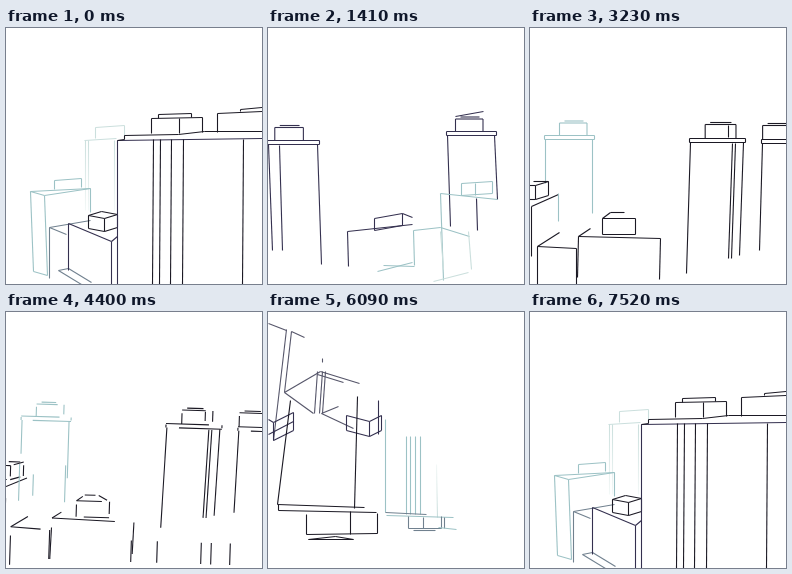
An HTML page with a canvas for the animation above (8 s loop, 256 px wide and 256 px high).

```html
<!DOCTYPE html>
<html>
<head>
<meta charset="utf-8">
<title>Line city</title>
<style>
html, body { margin: 0; width: 100%; height: 100%; overflow: hidden; background: #fff; }
canvas { display: block; width: 100vw; height: 100vh; }
</style>
</head>
<body>
<canvas id="stage"></canvas>
<script>
const SIZE = 256, LOOP = 8000, STEP = 130;
const canvas = document.getElementById('stage');
const ctx = canvas.getContext('2d');
const ratio = window.devicePixelRatio || 1;
canvas.width = canvas.height = SIZE * ratio;

const INK = '#1b1924', NAVY = '#34304f', GREY = '#56566a', SLATE = '#71818f';
const TEAL = '#9cc2c5', PALE = '#cbdfdd', MIST = '#f3f8f7';

const line = (color, x, y, dx, dy, end) => [{ color, x, y, dx, dy, end }];

const posts = (color, xs, y, h, lean = 0, end) =>
  xs.flatMap(x => line(color, x, y, lean, h, end));

// A block with top corners A, B, C, D and feet a, b, c, d.
// Each word of the walk is a chain of edges, such as "aABb" for an open front face.
function box(color, x, y, w, h, walk, { tilt = 0, lean = 0, depth = [0, 0], angle = 0 } = {}) {
  const top = { A: [0, 0], B: [w, tilt], C: [w + depth[0], tilt + depth[1]], D: depth };
  const sin = Math.sin(angle * Math.PI / 180), cos = Math.cos(angle * Math.PI / 180);
  const corner = name => {
    const foot = name !== name.toUpperCase();
    const [u, v] = top[name.toUpperCase()];
    const px = u + (foot ? lean : 0), py = v + (foot ? h : 0);
    return [x + px * cos - py * sin, y + px * sin + py * cos];
  };
  return walk.split(' ').flatMap(chain => {
    const pts = [...chain].map(corner);
    return pts.slice(1).flatMap(([qx, qy], i) => {
      const [px, py] = pts[i];
      return line(color, px, py, qx - px, qy - py);
    });
  });
}

// A tower seen from the front: roof slab, hut with a lid, and two legs.
function tower(color, x, y, w, [left, right], { lean = 0, hut = 0.3 } = {}) {
  const hutX = x + w * hut, hutH = w / 4;
  return [
    box(color, x, y, w, 4, 'aABba'),
    posts(color, [x + 1], y + 4, left, lean),
    posts(color, [x + w - 2], y + 4, right, lean),
    box(color, hutX, y - hutH, w * 0.55, hutH, 'aABb'),
    line(color, hutX + 5, y - hutH - 2, w * 0.38, 0)
  ].flat();
}

const skyline = [
  box(PALE, 78, 112, 32, 0, 'AB', { tilt: -2 }),
  box(PALE, 89, 99, 29, 11, 'aABb', { tilt: -2 }),
  posts(PALE, [79, 82, 108], 112, 70, 0, MIST),
  box(TEAL, 24, 163, 14, 80, 'baABCA Bb', { tilt: 4, lean: 3, depth: [46, -7] }),
  box(TEAL, 48, 152, 27, 9, 'aABb', { tilt: -2 }),
  posts(TEAL, [84], 160, 24),
  box(SLATE, 43, 199, 17, 51, 'aAB AD', { tilt: 7, depth: [41, -7] }),
  box(SLATE, 52, 242, 23, 0, 'BADC', { tilt: 14, depth: [10, -2] }),
  box(NAVY, 62, 195, 43, 47, 'aABb BC', { tilt: 18, depth: [6, -5] }),
  box(INK, 82, 187, 16, 13, 'aABCDA Bb abcC', { tilt: 3, depth: [13, -4] }),
  box(NAVY, 111, 112, 145, 144, 'aAB', { tilt: -2 }),
  posts(INK, [147, 154, 165, 177, 237], 111, 145, -1),
  box(INK, 118, 107, 54, 4, 'aABC', { tilt: -1, depth: [26, -3] }),
  line(INK, 198, 103, 58, 0),
  line(INK, 111, 112, 7, -1),
  box(INK, 145, 90, 51, 15, 'aABb', { tilt: -1 }),
  box(INK, 152, 86, 33, 4, 'aABb', { tilt: -1 }),
  posts(INK, [173], 90, 15),
  box(INK, 211, 85, 45, 19, 'aAB', { tilt: -2 }),
  box(INK, 234, 81, 22, 2, 'aAB', { tilt: -2 })
].flat();

const avenue = [
  tower(NAVY, -1, 112, 52, [106, 120], { lean: 4, hut: 0.14 }),
  posts(NAVY, [11], 117, 105, 3),
  tower(NAVY, 178, 103, 50, [91, 64], { lean: 3, hut: 0.18 }),
  posts(NAVY, [208], 170, 32, 1),
  line(NAVY, 187, 88, 28, -5),
  box(NAVY, 79, 203, 65, 35, 'aAB', { tilt: -7, lean: 1 }),
  box(NAVY, 106, 190, 28, 12, 'aABba BC', { tilt: -5, depth: [10, 4] }),
  box(TEAL, 172, 165, 57, 87, 'aAB', { tilt: 6, lean: 3 }),
  box(TEAL, 193, 155, 31, 12, 'aABba', { tilt: -2 }),
  posts(TEAL, [207], 155, 12),
  box(TEAL, 145, 202, 27, 35, 'aABC', { tilt: -3, lean: 1, depth: [29, 9] }),
  posts(PALE, [172, 200], 203, 38, 3),
  line(TEAL, 109, 243, 35, -9),
  line(TEAL, 115, 237, 31, 1),
  line(PALE, 165, 253, 35, -9)
].flat();

const rooftops = [
  box(INK, 38, 74, 39, 15, 'aABCc Bb', { tilt: 2, depth: [12, -9] }),
  box(INK, 51, 67, 33, 0, 'ABC', { tilt: 3, depth: [3, -6] }),
  box(INK, 50, 96, 32, 7, 'ABCcb', { tilt: 1, depth: [25, -11] }),
  box(INK, 66, 102, 16, 115, 'ABb', { tilt: 1, lean: -3 }),
  posts(INK, [107], 94, 150, -5),
  box(TEAL, 68, 104, 31, 10, 'aABb'),
  box(TEAL, 93, 118, 26, 97, 'ABb', { lean: -1 }),
  posts(TEAL, [99, 114], 118, 80, -1),
  posts(PALE, [93], 118, 52, -1, MIST),
  box(INK, 121, 176, 40, 18, 'aABCc CA', { tilt: -2, depth: [18, 4] }),
  box(INK, 104, 195, 83, 67, 'ABCc Bb', { tilt: -6, depth: [35, 10] }),
  line(INK, 181, 203, 41, -4),
  box(GREY, 104, 190, 23, 14, 'aABba', { tilt: 6 }),
  box(GREY, 98, 195, 52, 40, 'ABb', { tilt: 21 }),
  line(GREY, 101, 196, 16, -8),
  posts(GREY, [117], 190, 24),
  box(INK, 121, 236, 34, 18, 'ABCc Bb', { tilt: -9, depth: [24, 13] }),
  line(INK, 110, 251, 45, -10),
  line(INK, 130, 258, 49, -18)
].flat();

const towers = [
  tower(TEAL, 14, 107, 50, [44, 74]),
  tower(INK, 159, 110, 56, [131, 113], { lean: -4, hut: 0.28 }),
  posts(INK, [202, 205], 115, 115, -4),
  posts(INK, [198], 97, 12),
  tower(INK, 231, 111, 56, [107, 107], { lean: -3, hut: 0.02 }),
  box(INK, -10, 157, 15, 14, 'DCBAabcC Bb', { depth: [13, -4] }),
  box(INK, 1, 178, 27, 50, 'aAB', { tilt: -12 }),
  posts(TEAL, [28], 165, 28),
  box(INK, 72, 190, 33, 16, 'aABba AD', { depth: [8, -6] }),
  line(INK, 80, 184, 14, 0),
  box(INK, 48, 208, 82, 41, 'aABb AD', { tilt: 2, lean: -1, depth: [12, -8] }),
  box(INK, 7, 218, 39, 38, 'aABb AD', { tilt: 2, depth: [22, -14] })
].flat();

const finish = [
  posts(INK, [128, 154, 198, 208, 227], 228, 28),
  posts(TEAL, [14, 60], 155, 48),
  line(INK, 94, 184, 11, 6)
].flat();

const slant = { angle: 40 };
const tilted = [
  box(GREY, 103, 133, 7, 125, 'aAB AD', { ...slant, depth: [2, 12] }),
  box(GREY, 95, 160, 16, 39, 'baAB', slant),
  box(GREY, 97, 165, 12, 34, 'aAB', slant),
  box(GREY, 39, 182, 0, 58, 'Aa', slant),
  box(GREY, 65, 182, 0, 53, 'Aa', slant),
  box(GREY, 43, 197, 31, 0, 'AB', slant),
  box(NAVY, 17, 209, 18, 14, 'baABb', slant),
  box(NAVY, 35, 201, 11, 32, 'aAB', slant),
  box(NAVY, 18, 217, 0, 24, 'Aa', slant),
  box(NAVY, 0, 230, 31, 0, 'AB', slant),
  box(SLATE, 34, 228, 42, 14, 'baABb', { angle: 31 }),
  box(PALE, 103, 202, 22, 51, 'aAB', { angle: 43 }),
  line(GREY, 103, 202, -8, 45),
  line(GREY, 109, 105, 9, -17),
  line(SLATE, 118, 88, 26, -23),
  line(SLATE, 201, 6, -44, 44),
  line(GREY, 157, 50, 12, -7),
  line(GREY, 181, 23, 11, -4),
  line(GREY, 145, 70, 9, 2),
  line(GREY, 149, 64, 11, -2),
  box(SLATE, 153, 62, 13, 11, 'aAB', { angle: 45 }),
  line(TEAL, 145, 72, -25, 25),
  box(PALE, 155, 77, 30, 25, 'aAB', slant),
  line(TEAL, 196, 43, -19, 21),
  line(PALE, 198, 49, -11, 11)
].flat();

const inverted = [
  line(GREY, 0, 11, 18, 7),
  line(GREY, 18, 17, -13, 111),
  box(GREY, 23, 19, 13, 61, 'aAB', { tilt: 6, lean: -7 }),
  box(GREY, 16, 80, 36, 0, 'ABC', { tilt: -21, depth: [39, 12] }),
  line(GREY, 16, 80, 29, 21),
  line(GREY, 49, 62, 26, 8),
  posts(GREY, [49, 54, 57], 59, 42, -3),
  posts(GREY, [54], 46, 4),
  box(GREY, 53, 101, 32, 0, 'BAD', { tilt: 15, depth: [17, -7] }),
  box(NAVY, 78, 103, 23, 15, 'aABba BCcb', { tilt: 6, depth: [12, -6] }),
  posts(NAVY, [110], 88, 34),
  box(NAVY, 5, 110, 20, 18, 'aABba AD', { tilt: -10, depth: [-5, -3] }),
  line(NAVY, 0, 122, 25, -13),
  box(INK, 9, 192, 87, -104, 'aAB', { tilt: 3, lean: 13 }),
  box(INK, 10, 198, 98, -6, 'aAB', { tilt: 2 }),
  posts(INK, [86], 196, -112, 3),
  box(INK, 38, 222, 71, -20, 'aABb', { tilt: -1 }),
  posts(INK, [82], 222, -23),
  box(INK, 40, 227, 27, 0, 'ABCA', { tilt: -3, depth: [18, 3] }),
  posts(TEAL, [117], 200, -93),
  posts(TEAL, [138, 142, 147, 152], 202, -78),
  posts(PALE, [169], 205, -53, -1, MIST),
  line(SLATE, 117, 200, 41, 2),
  line(TEAL, 118, 203, 67, 2),
  box(SLATE, 140, 216, 33, -12, 'aABb'),
  posts(SLATE, [155, 176], 216, -11),
  line(SLATE, 145, 218, 22, 0),
  line(TEAL, 170, 215, 18, 2)
].flat();

// at: step number, roll: degrees, pan: drift towards the next view, ease: curve of the roll.
const views = [
  { at: 0, roll: 0, pan: -70, art: skyline },
  { at: 8, roll: 0, pan: -55, art: avenue },
  { at: 14, roll: 0, pan: 60, art: rooftops },
  { at: 22, roll: 0, pan: 0, art: towers },
  { at: 25, roll: 0, pan: 0, art: [...towers, ...finish], ease: u => u ** 1.8 },
  { at: 31, roll: 45, pan: 0, art: tilted },
  { at: 39, roll: 180, pan: 0, art: inverted, ease: u => 1 - (1 - u) ** 1.6 },
  { at: 50, roll: 360, pan: 0, art: skyline }
];

function drawStroke({ color, x, y, dx, dy, end }, part) {
  ctx.strokeStyle = color;
  if (end) {
    const fade = ctx.createLinearGradient(x, y, x + dx, y + dy);
    fade.addColorStop(0, color);
    fade.addColorStop(1, end);
    ctx.strokeStyle = fade;
  }
  ctx.beginPath();
  ctx.moveTo(x, y);
  ctx.lineTo(x + dx * part, y + dy * part);
  ctx.stroke();
}

function drawArt(art, part, shift, roll) {
  if (part <= 0) return;
  ctx.save();
  ctx.translate(128 + shift, 128);
  ctx.rotate(roll * Math.PI / 180);
  ctx.translate(-127.5, -127.5);
  art.forEach(stroke => drawStroke(stroke, part));
  ctx.restore();
}

function stepAt(t) {
  const count = start => Math.max(0, Math.min(25, Math.floor((t - start) / STEP) + 1));
  return count(500) + count(4400);
}

function draw(t) {
  const step = stepAt(t);
  let i = 0;
  while (i < views.length - 2 && step >= views[i + 1].at) i++;
  const from = views[i], to = views[i + 1];
  const u = (step - from.at) / (to.at - from.at);
  const turn = (from.ease ? from.ease(u) : u) * (to.roll - from.roll);
  const kept = from.art.filter(s => to.art.includes(s));
  const fresh = art => art.filter(s => !kept.includes(s));

  ctx.setTransform(ratio, 0, 0, ratio, 0, 0);
  ctx.fillStyle = '#fff';
  ctx.fillRect(0, 0, SIZE, SIZE);
  ctx.lineWidth = 1.1;
  drawArt(kept, 1, 0, 0);
  drawArt(fresh(from.art), 1 - u * 1.4, from.pan * u, turn);
  drawArt(fresh(to.art), 1 - (1 - u) * 1.4, from.pan * (u - 1), turn + from.roll - to.roll);
}

const begin = performance.now();
function tick() {
  draw((performance.now() - begin) % LOOP);
  requestAnimationFrame(tick);
}
tick();
</script>
</body>
</html>
```
